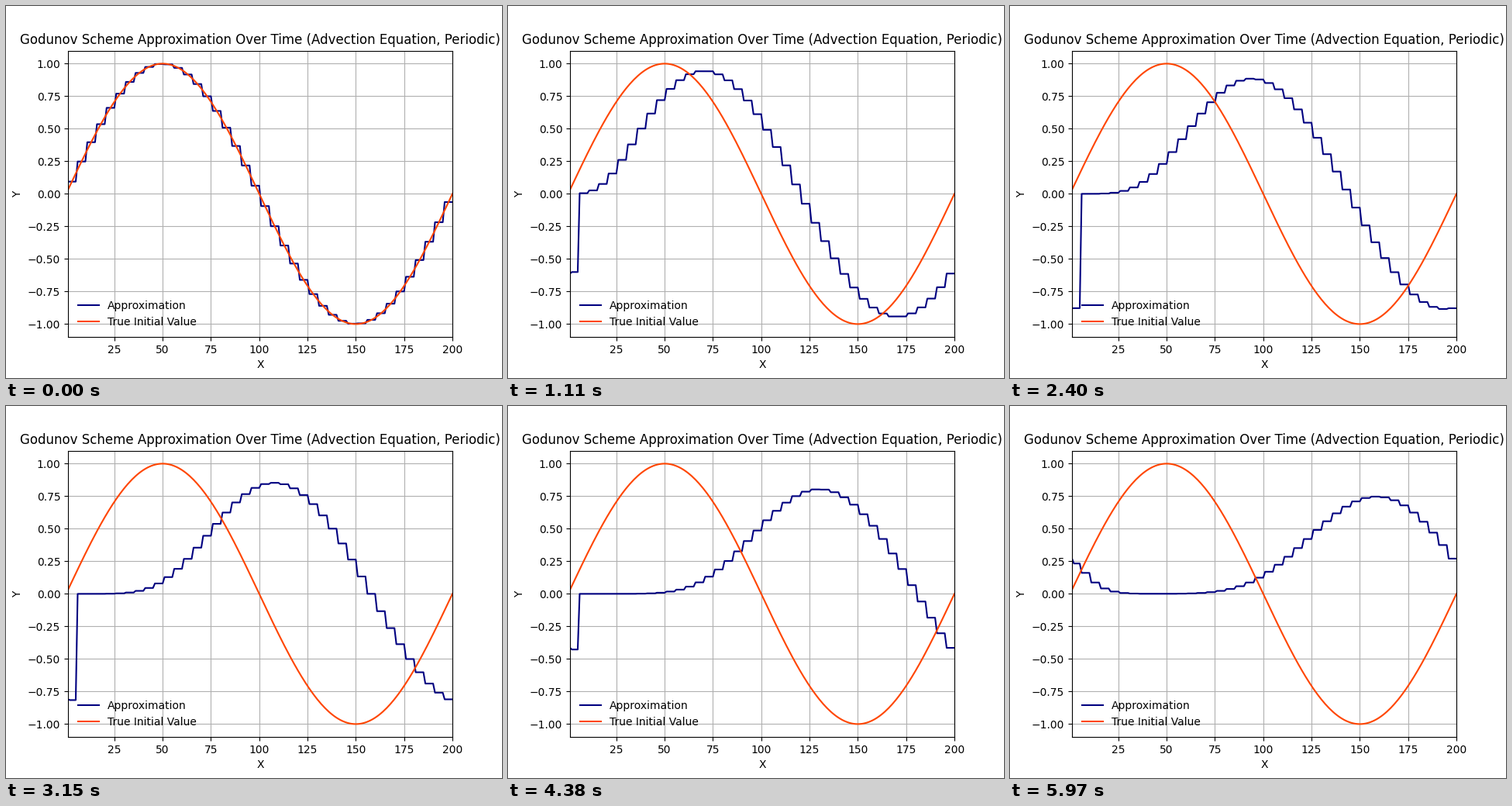
A matplotlib script that plays this animation: 640x480 px, repeating every 6 s.

```python
import numpy as np
import matplotlib.pyplot as plt
from matplotlib.animation import FuncAnimation

N = 200          # grid points
CELL = 5         # points per cell
FRAMES = 200
CFL = 0.1


def flux(left, right):
    """Upwind flux, zero across a sign change from below."""
    return 0.0 if left < 0 < right else left


def step(u):
    """Advance the cells in place, from left to right."""
    u = u.copy()
    for i in range(0, N, CELL):
        inflow = flux(u[i - CELL], u[i]) if i else 0.0
        outflow = flux(u[i], u[(i + CELL) % N])
        u[i:i + CELL] = u[i] - CFL * (outflow - inflow)
        u[0] = u[-1]
    return u


x = np.arange(1, N + 1)
wave = np.sin(2 * np.pi * x / N)

states = [np.repeat(wave.reshape(-1, CELL).mean(axis=1), CELL)]
while len(states) < FRAMES:
    states.append(step(states[-1]))

plt.rcParams["font.family"] = "DejaVu Sans"
fig, ax = plt.subplots(figsize=(6.4, 4.8), dpi=100)
approx, = ax.plot(x, states[0], color="navy", label="Approximation")
ax.plot(x, wave, color="orangered", label="True Initial Value")
ax.set(xlim=(1, N), ylim=(-1.1, 1.1), xlabel="X", ylabel="Y")
ax.set_title("Godunov Scheme Approximation Over Time "
             "(Advection Equation, Periodic)")
ax.grid(True)
ax.legend(loc="lower left", frameon=False)


def update(frame):
    approx.set_ydata(states[frame])
    return approx,


anim = FuncAnimation(fig, update, frames=FRAMES, interval=30,
                     repeat=True, repeat_delay=0)
plt.show()
```
